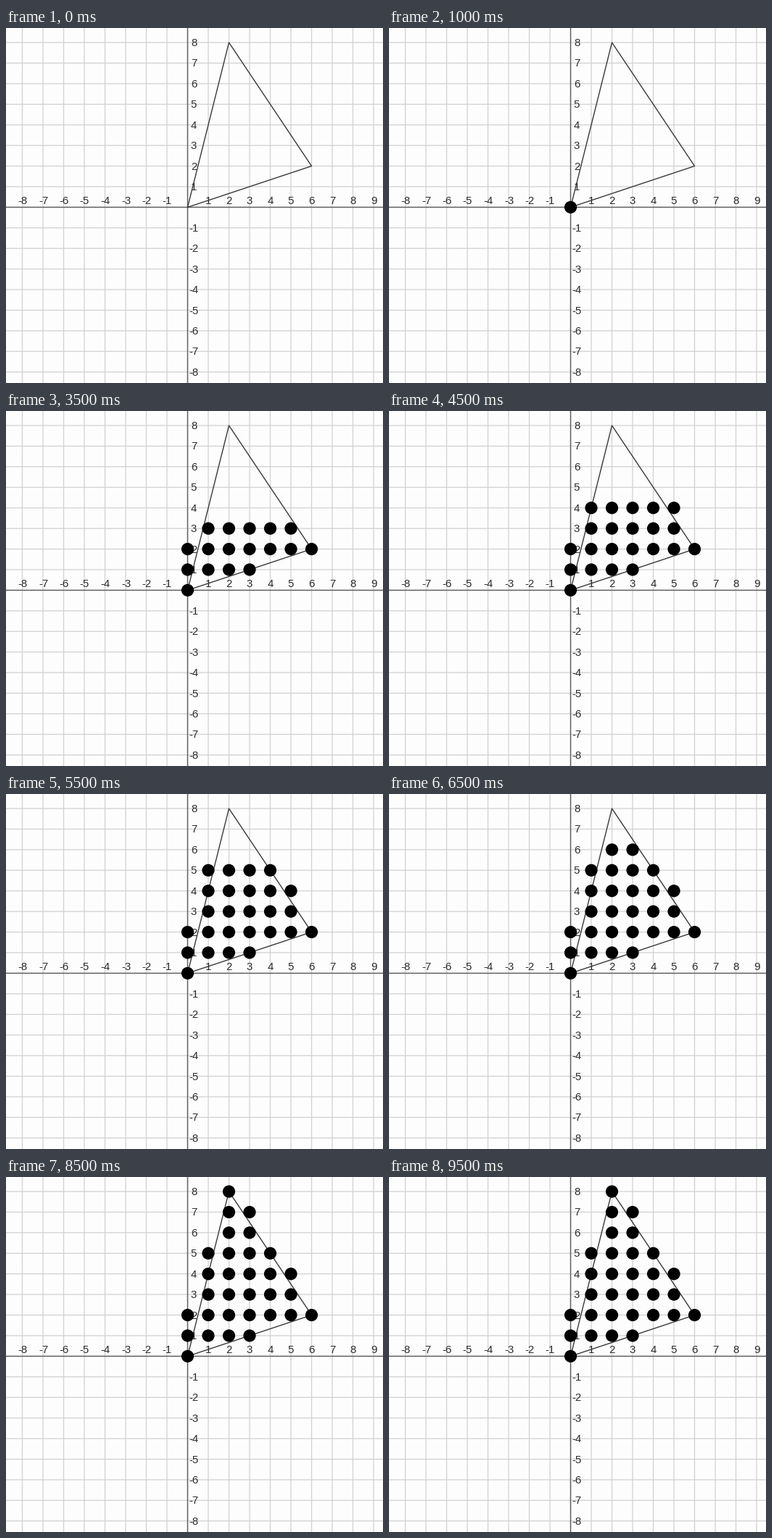
Recreate the animation shown at these times as a matplotlib script. Size 520x490 px, loop 10000 ms.

```python
import matplotlib.pyplot as plt
from matplotlib.animation import FuncAnimation
from matplotlib.patches import Circle

WIDTH, HEIGHT, DPI = 520, 490, 100
PX = 72 / DPI
UNIT_X, UNIT_Y = 28.5, 28.42
ORIGIN_X, ORIGIN_Y = 250.5, 247.4
TRIANGLE = [(0, 0), (2, 8), (6, 2)]
STEP_MS, FRAMES = 500, 20
PAPER, GRID, AXIS = "#fdfdfd", "#d2d2d2", "#606060"
INK, LINE = "#2c2c2c", "#3a3a3a"


def to_px(x, y):
    return ORIGIN_X + x * UNIT_X, ORIGIN_Y - y * UNIT_Y


def edge_x(a, b, y):
    """Column of edge a-b at height y, rounded to the lattice."""
    return round(a[0] + (b[0] - a[0]) * (y - a[1]) / (b[1] - a[1]))


def row_columns(y):
    low, top, right = TRIANGLE
    left_col = edge_x(low, top, y)
    right_col = edge_x(low, right, y) if y <= right[1] else edge_x(right, top, y)
    return range(left_col, right_col + 1)


fig = plt.figure(figsize=(WIDTH / DPI, HEIGHT / DPI), dpi=DPI, facecolor=PAPER)
ax = fig.add_axes([0, 0, 1, 1])
ax.set_xlim(0, WIDTH)
ax.set_ylim(HEIGHT, 0)
ax.axis("off")


def label(x, y, value):
    ax.text(x, y, str(value), family="Liberation Sans", size=15 * PX,
            color=INK, ha="center", va="baseline", zorder=3)


grid_style = dict(color=GRID, lw=1.3 * PX, snap=False, zorder=1)
axis_style = dict(color=AXIS, lw=1.5 * PX, snap=False, zorder=2)

for n in range(-9, 10):
    if n == 0:
        continue
    x, y = to_px(n, n)
    ax.axvline(x, **grid_style)
    label(x + (0.5 if n < 0 else 0), 243, n)
    if abs(n) < 9:
        ax.axhline(y, **grid_style)
        label(259, y + 5, n)

ax.axhline(ORIGIN_Y, **axis_style)
ax.axvline(ORIGIN_X, **axis_style)
corners = [to_px(*p) for p in TRIANGLE + TRIANGLE[:1]]
ax.plot(*zip(*corners), color=LINE, lw=1.4 * PX, zorder=4)

rows = []
for y in range(TRIANGLE[1][1] + 1):
    dots = [Circle(to_px(x, y), 8.6, fc="black", lw=0, zorder=5, visible=False)
            for x in row_columns(y)]
    for dot in dots:
        ax.add_patch(dot)
    rows.append(dots)


def update(frame):
    # One more row is filled every second, the first after half a second.
    filled = (frame + 1) // 2
    for y, dots in enumerate(rows):
        for dot in dots:
            dot.set_visible(y < filled)
    return [dot for dots in rows for dot in dots]


animation = FuncAnimation(fig, update, frames=FRAMES, interval=STEP_MS,
                          repeat=True, repeat_delay=0, blit=False)
plt.show()
```
